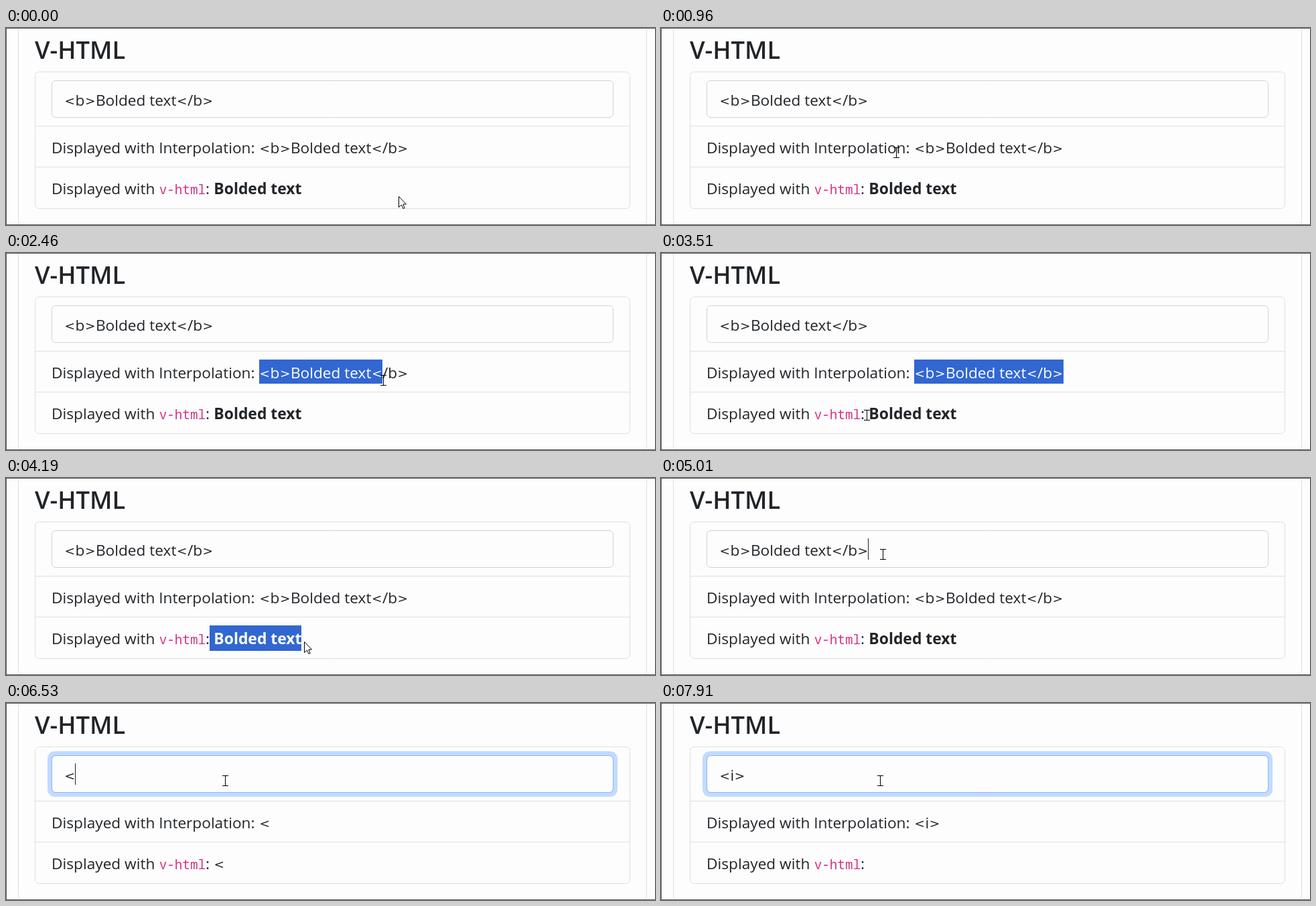
Animation, 969 px wide and 294 px high, one loop 8 s. Source, as an HTML page with a canvas:

```html
<!DOCTYPE html>
<html lang="en">
<head>
<meta charset="utf-8">
<title>V-HTML</title>
<style>
  html, body { margin: 0; width: 100%; height: 100%; overflow: hidden; background: #fdfdfd; }
  canvas { display: block; }
</style>
</head>
<body>
<canvas id="stage" width="969" height="294"></canvas>
<script>
const ctx = document.getElementById('stage').getContext('2d');
const LOOP = 8000, TICK = 135.5, BLINK = 530;
const INK = '#212529', LINE = '#dfdfdf', PAPER = '#fdfdfd', SELECT = '#3267d2', EDGE = '#606060';
const REGULAR = '22.65px "Open Sans", "Noto Sans", sans-serif';
const BOLD = '700 22.9px "Open Sans", "Noto Sans", sans-serif';
const TITLE = '600 36.3px "Open Sans", "Noto Sans", sans-serif';
const CODE = '19.25px "Noto Sans Mono", monospace';
const BRACKET = '18.5px "DejaVu Sans", sans-serif';
const BRACKET_PAD = 0.5;

const FULL = '<b>Bolded text</b>', TYPED = '<i>';
const KEYS = [6530, 6950, 7380];
const FIELD_X = 87, OUT_X = 378, HTML_X = 304.4;

// Hand movements: first tick, last tick, and where the hot spot arrives
const START = { x: 586, y: 251 };
const MOVES = [
  [2, 4, 529, 229], [4, 7, 351, 186], [11, 14, 390, 183], [14, 15, 382, 188],
  [15, 19, 597, 190], [20, 24, 295, 237], [24, 26, 307, 242], [26, 30, 420, 249],
  [30, 31, 445, 244], [31, 32, 460, 246], [33, 34, 442, 238], [34, 35, 355, 148],
  [35, 36, 331, 114], [37, 39, 327, 116]
];

const clamp = v => Math.max(0, Math.min(1, v));
const smooth = v => v * v * (3 - 2 * v);
const within = (t, from, to) => t >= from && t < to;

// The screen was sampled at an even pace, so the pointer moves in ticks
const tickAt = t => Math.floor((t + 15) / TICK);

function pointerAt(tick) {
  let { x, y } = START;
  for (const [from, to, toX, toY] of MOVES) {
    const k = smooth(clamp((tick - from) / (to - from)));
    x += (toX - x) * k;
    y += (toY - y) * k;
  }
  return { x: Math.round(x), y: Math.round(y) };
}

// Text under the pointer turns the arrow into a beam
function overText({ x, y }) {
  const inside = (right, top, bottom) => x >= 68 && x <= right && y >= top && y <= bottom;
  return inside(906, 79, 133) || inside(602, 155, 199) || inside(441, 217, 257);
}

// Angle brackets use their own wider face
function eachPart(text, font, visit) {
  let x = 0;
  for (const part of text.split(/([<>])/)) {
    const bracket = part === '<' || part === '>';
    const pad = bracket ? BRACKET_PAD : 0;
    ctx.font = bracket ? BRACKET : font;
    if (visit) visit(part, x + pad, bracket ? -0.8 : 0);
    x += ctx.measureText(part).width + 2 * pad;
  }
  return x;
}

const textWidth = (text, font = REGULAR) => eachPart(text, font);

function write(text, x, y, font = REGULAR, color = INK) {
  ctx.fillStyle = color;
  eachPart(text, font, (part, dx, dy) => ctx.fillText(part, x + dx, y + dy));
}

function highlight(text, x, y, font, end, top, height) {
  const left = Math.floor(x), width = Math.round(end) - left;
  if (width <= 0) return;
  ctx.save();
  ctx.beginPath();
  ctx.rect(left, top, width, height);
  ctx.clip();
  bar(left, top, width, height, SELECT);
  write(text, x, y, font, '#fff');
  ctx.restore();
}

// Letter boundary closest to the pointer
function snap(text, x, font, pointer) {
  let best = x;
  for (let i = 1; i <= text.length; i++) {
    const edge = x + textWidth(text.slice(0, i), font);
    if (Math.abs(edge - pointer.x) < Math.abs(best - pointer.x)) best = edge;
  }
  return best;
}

function box(x, y, w, h, r, stroke, fill) {
  ctx.beginPath();
  ctx.roundRect(x, y, w, h, r);
  if (fill) {
    ctx.fillStyle = fill;
    ctx.fill();
  }
  if (stroke) {
    ctx.strokeStyle = stroke;
    ctx.lineWidth = 1;
    ctx.stroke();
  }
}

function bar(x, y, w, h, color) {
  ctx.fillStyle = color;
  ctx.fillRect(x, y, w, h);
}

function drawPanel(focus) {
  bar(0, 0, 969, 294, PAPER);
  box(18.5, -20.5, 938, 314, 6, LINE);
  bar(0, 0, 969, 1, EDGE);
  bar(0, 0, 1, 294, EDGE);
  bar(0, 293, 969, 1, EDGE);

  box(43.5, 65.5, 888, 204, 6, LINE);
  bar(44, 146, 887, 1, LINE);
  bar(44, 207, 887, 1, LINE);

  ctx.globalAlpha = focus;
  box(62, 72, 851, 68, 11, null, '#c2dbfe');
  ctx.globalAlpha = 1;
  box(68.5, 78.5, 838, 55, 5.5, '#ced4da', PAPER);
  ctx.globalAlpha = focus;
  box(68.5, 78.5, 838, 55, 5.5, '#86b7fe');
  ctx.globalAlpha = 1;
}

function drawBeam({ x, y }) {
  bar(x - 4, y - 8, 9, 1, '#000');
  bar(x, y - 7, 1, 14, '#000');
  bar(x - 4, y + 7, 9, 1, '#000');
}

function drawArrow({ x, y }) {
  ctx.save();
  ctx.translate(x + 0.5, y + 0.5);
  ctx.fillStyle = '#fff';
  ctx.strokeStyle = '#000';
  ctx.lineWidth = 1;
  const shape = new Path2D('M0 0V16L4 12.5L6.5 18L8.7 17L6.4 11.5H11Z');
  ctx.fill(shape);
  ctx.stroke(shape);
  ctx.restore();
}

function draw(t) {
  const tick = tickAt(t);
  const pointer = pointerAt(tick);
  const typed = KEYS.filter(key => key <= t).length;
  const value = typed ? TYPED.slice(0, typed) : FULL;
  const allSelected = within(t, 5690, KEYS[0]);

  drawPanel(clamp((tick - 37) / 2));
  write('V-HTML', 43, 46, TITLE);

  write(value, FIELD_X, 116);
  const fieldEnd = FIELD_X + textWidth(value);
  if (allSelected) highlight(value, FIELD_X, 116, REGULAR, fieldEnd, 88, 36);
  const caretLit = [5010, ...KEYS].some(edit => within(t, edit, edit + BLINK));
  if (caretLit && !allSelected) bar(Math.floor(fieldEnd), 90, 1, 32, INK);

  write('Displayed with Interpolation:', 68, 187);
  write(value, OUT_X, 187);
  if (within(t, 2070, 3640)) {
    const end = snap(value, OUT_X, REGULAR, pointerAt(Math.min(tick, 19)));
    highlight(value, OUT_X, 187, REGULAR, end, 159, 36);
  }

  write('Displayed with', 68, 248);
  write('v-html', 228.7, 248, CODE, '#d63384');
  write(':', 298, 248);
  if (value === FULL) {
    const bolded = ' Bolded text';
    write(bolded, HTML_X, 248, BOLD);
    if (within(t, 3640, 5010)) {
      const end = snap(bolded, HTML_X, BOLD, pointerAt(Math.min(tick, 31)));
      highlight(bolded, HTML_X, 248, BOLD, end, 220, 38);
    }
  } else if (value === '<') {
    write(value, 310, 248);
  }

  (overText(pointer) ? drawBeam : drawArrow)(pointer);
}

const start = performance.now();
function frame() {
  draw((performance.now() - start) % LOOP);
  requestAnimationFrame(frame);
}
frame();
</script>
</body>
</html>
```
